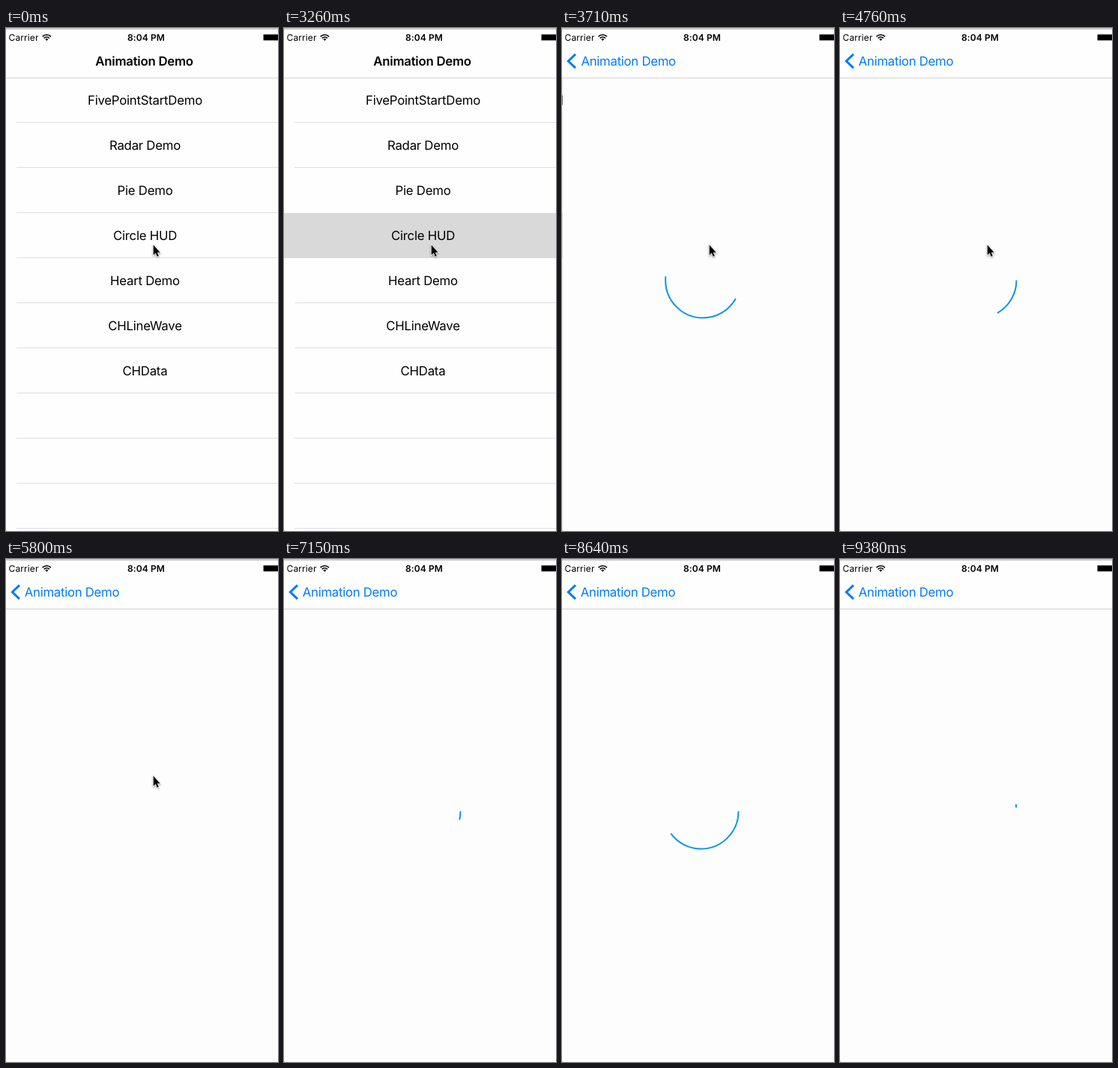
Write an HTML page that moves like this. It is 363x669 px and loops after 9.48 s.

```html
<!DOCTYPE html>
<html lang="en">
<head>
<meta charset="utf-8">
<title>Circle HUD</title>
<style>
  html, body { margin: 0; width: 100%; height: 100%; overflow: hidden; background: #fefefe; }
  svg { display: block; width: 363px; height: 669px; }
  text {
    font: 16.8px Inter, "Open Sans", sans-serif; letter-spacing: -0.25px;
    white-space: pre; text-rendering: geometricPrecision;
  }
  .bold { font-weight: 600; }
  .status { font-size: 12px; letter-spacing: 0.12px; }
  .mid { text-anchor: middle; }
  .blue { fill: #007aff; letter-spacing: -0.3px; }
</style>
</head>
<body>
<svg viewBox="0 0 363 669">
  <rect width="363" height="669" fill="#fefefe"/>

  <g id="list">
    <rect id="press" x="-2" y="246" width="375" height="60" fill="#d9d9d9"/>
  </g>

  <g id="page">
    <rect y="67" width="375" height="602" fill="#fdfdfd"/>
    <path d="M-.5 67V669" stroke="#000" stroke-opacity=".12"/>
    <circle id="ring" cx="187.5" cy="335.5" r="50" pathLength="1" fill="none" stroke="#0896ea" stroke-width="2"/>
  </g>

  <rect width="363" height="66" fill="#fefefe"/>
  <rect y="66" width="363" height="1" fill="#d2d2d2"/>
  <rect width="363" height="1" fill="#d0d0d0"/>
  <rect y="1" width="363" height="1" fill="#c0c0c0"/>
  <rect y="668" width="1" height="1" fill="#bbb"/>

  <text class="status" x="3.5" y="16.5">Carrier</text>
  <text class="status bold mid" x="187" y="16.5">8:04 PM</text>
  <g fill="none" stroke="#000" stroke-width="1.6">
    <path d="M48.6 11.4a8 8 0 0 1 11.4 0M50.7 13.6a5 5 0 0 1 7.2 0"/>
    <path d="M54.3 17l-2-2a2.8 2.8 0 0 1 4 0z" fill="#000" stroke="none"/>
  </g>
  <rect x="343.5" y="8.5" width="24" height="8" rx="1" stroke="#888"/>

  <text id="title" class="bold" y="50">Animation Demo</text>
  <g id="back">
    <path d="M18 34.8L8.4 44l9.6 9.2" fill="none" stroke="#007aff" stroke-width="3"/>
    <text id="backText" class="blue" y="50">Animation Demo</text>
  </g>

  <path id="cursor" d="M-.3 .5V14L2.7 11.2 4.8 15.9 6.8 15 4.8 10.4H8.7Z" stroke="#fff" stroke-width="1.6"
        paint-order="stroke" style="filter:drop-shadow(0 1px 1px rgba(0,0,0,.4))"/>
</svg>

<script>
const LOOP = 9480, TAP = 3260, PUSH = 3333, SPIN = 1250;
const $ = id => document.getElementById(id);
const mix = (a, b, k) => a + (b - a) * k;

// List rows and separators
const names = ['FivePointStartDemo', 'Radar Demo', 'Pie Demo', 'Circle HUD', 'Heart Demo', 'CHLineWave', 'CHData'];
let rows = '';
for (let i = 0; i < 10; i++) {
  const pressed = i === 2 || i === 3;
  rows += `<rect class="${pressed ? 'edge' : ''}" x="14" y="${125 + 60 * i}" width="359" height="1" fill="#e0e0e2"/>`;
  if (names[i]) rows += `<text class="mid" x="185.5" y="${102 + 60 * i}">${names[i]}</text>`;
}
$('list').insertAdjacentHTML('beforeend', rows);
const edges = document.querySelectorAll('.edge');

const ticks = [0];
for (let t = TAP, k = 1; k <= 42; k++) {
  ticks.push(t);
  t += [14, 31, 41].includes(k) ? 140 : 150;
}

// Standard ease curve, cubic-bezier(.25, .1, .25, 1)
function ease(x) {
  let lo = 0, hi = 1;
  for (let i = 0; i < 30; i++) {
    const s = (lo + hi) / 2;
    if (0.75 * s * (1 - s) + s ** 3 < x) lo = s; else hi = s;
  }
  return 0.3 * lo * (1 - lo) ** 2 + 3 * lo * lo * (1 - lo) + lo ** 3;
}

// Pointer route: time, x, y
const route = [
  [0, 197, 288], [6600, 197, 288], [6850, 283, 448], [7000, 352, 607], [7100, 400, 640],
  [7700, 380, 668], [7750, 339, 652], [7890, 331, 645], [8040, 331, 685], [LOOP, 331, 685]
];
function pointer(t) {
  const i = route.findIndex((p, n) => n && t <= p[0]);
  const [a, b] = [route[i - 1], route[i]];
  const k = (t - a[0]) / (b[0] - a[0]);
  return [mix(a[1], b[1], k), mix(a[2], b[2], k)];
}

const move = (id, x, y = 0) => $(id).setAttribute('transform', `translate(${x} ${y})`);

function draw(t) {
  const pressed = t >= TAP;
  $('press').style.display = pressed ? '' : 'none';
  edges.forEach(e => e.style.display = pressed ? 'none' : '');

  // Push transition: remaining share of a critically damped slide
  const w = 0.0187 * Math.max(0, t - PUSH);
  const rest = (1 + w) * Math.exp(-w);
  move('page', 375 * rest - 2);
  move('list', -112 * (1 - rest));
  for (const id of ['title', 'backText']) $(id).setAttribute('x', mix(24.8, 119.3, rest));
  $('title').style.opacity = rest < 0.02 ? 0 : rest;
  $('back').style.opacity = 1 - rest;

  // The head runs 0 to 1 while the tail runs -0.9 to 1
  const head = ease(Math.max(0, t - PUSH) % SPIN / SPIN);
  const tail = Math.max(0, mix(-0.9, 1, head));
  const ring = $('ring');
  ring.style.display = head - tail < 0.002 ? 'none' : '';
  ring.setAttribute('stroke-dasharray', `${head - tail} 2`);
  ring.setAttribute('stroke-dashoffset', -tail);

  move('cursor', ...pointer(t));
}

const start = performance.now();
function frame() {
  const t = (performance.now() - start) % LOOP;
  draw(ticks.findLast(k => k <= t));
  requestAnimationFrame(frame);
}
frame();
</script>
</body>
</html>
```
